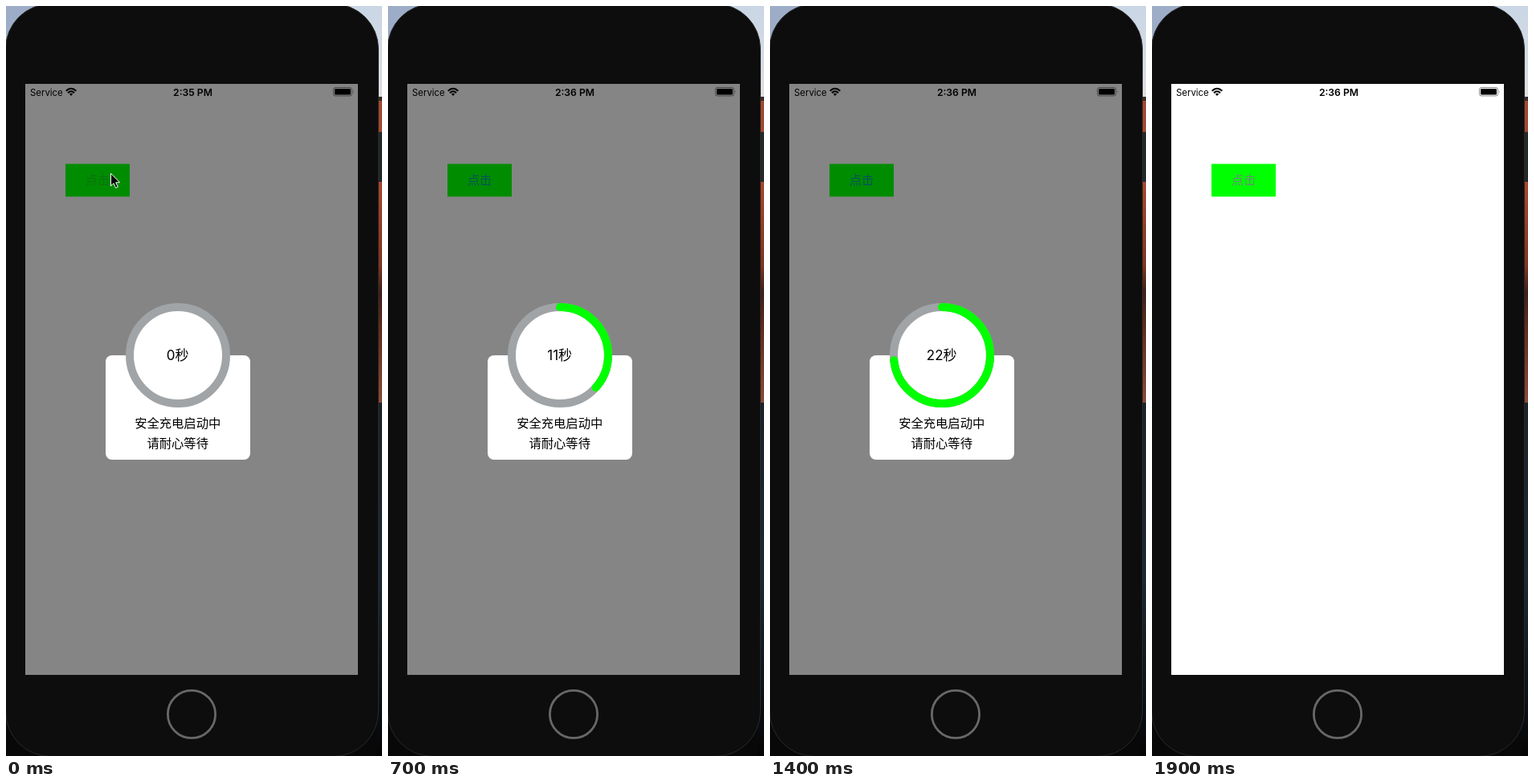
Recreate the animation shown at these times as an HTML page. Size 468x934 px, loop 2 s.

```html
<!DOCTYPE html>
<html lang="zh-CN">
<head>
<meta charset="utf-8">
<title>Charging countdown</title>
<style>
  html, body { margin: 0; width: 100%; height: 100%; overflow: hidden; background: #0d0d0d; }
  svg { display: block; width: 100%; height: 100%; }
  text { font-family: Inter, "Noto Sans CJK SC", "Noto Sans CJK", sans-serif; }
  .middle { text-anchor: middle; }
  .message { font-size: 15.3px; }
</style>
</head>
<body>
<svg viewBox="0 0 468 934">
  <defs>
    <linearGradient id="sky" x2="0" y2="1">
      <stop stop-color="#c9d6e5"/>
      <stop offset="1" stop-color="#dedfe2"/>
    </linearGradient>
    <linearGradient id="cliff" x2="0" y2="1">
      <stop stop-color="#a9472e"/>
      <stop offset=".38" stop-color="#81351f"/>
      <stop offset=".5" stop-color="#40201a"/>
      <stop offset=".72" stop-color="#6d301f"/>
      <stop offset="1" stop-color="#8b4a38"/>
    </linearGradient>
    <linearGradient id="shade" x2="0" y2="1">
      <stop stop-color="#1c2229"/>
      <stop offset=".5" stop-color="#1b2935"/>
      <stop offset=".85" stop-color="#0b1016"/>
      <stop offset="1" stop-color="#050505"/>
    </linearGradient>
  </defs>

  <!-- Desktop behind the phone -->
  <rect width="468" height="934" fill="#080808"/>
  <rect width="60" height="60" fill="#9dadc8"/>
  <rect x="400" width="68" height="113" fill="url(#sky)"/>
  <rect x="460" y="113" width="8" height="5" fill="#382a28"/>
  <rect x="460" y="118" width="8" height="39" fill="#a34a30"/>
  <rect x="460" y="157" width="8" height="62" fill="#23292b"/>
  <rect x="460" y="219" width="8" height="275" fill="url(#cliff)"/>
  <rect x="460" y="494" width="8" height="440" fill="url(#shade)"/>

  <!-- Phone -->
  <rect x="-.5" y="-2.5" width="464" height="937" rx="56" fill="#0d0d0d" stroke="#292929"/>
  <circle cx="231" cy="882" r="29.6" fill="none" stroke="#686868" stroke-width="2.8"/>
  <rect id="screen" x="24" y="97" width="414" height="736"/>

  <!-- Status bar -->
  <text x="30" y="111.7" font-size="11.4">Service</text>
  <text id="clock" class="middle" x="232.5" y="111.8" font-size="12.2" font-weight="600"></text>
  <g fill="none" stroke="#000" stroke-width="2">
    <path d="M74.7 105.8Q81 99.8 87.3 105.8M77 108.2Q81 104.4 85 108.2"/>
    <path d="M78.8 109.6Q81 107.7 83.2 109.6L81 112Z" fill="#000" stroke="none"/>
  </g>
  <rect x="407.5" y="101.5" width="23" height="10.5" rx="2.5" fill="none" stroke="#000" stroke-opacity=".45"/>
  <rect x="409" y="103" width="20" height="7.5" rx="1.2"/>
  <path d="M432 105q1.6 1.8 0 3.6z" fill-opacity=".5"/>

  <rect id="button" x="74" y="196.6" width="80" height="40.8"/>
  <text id="buttonLabel" class="middle" x="114" y="222.4" font-size="15">点击</text>

  <g id="dialog">
    <rect x="124" y="435" width="180" height="130" rx="8" fill="#fff"/>
    <circle cx="214" cy="435" r="60" fill="#fff" stroke="#a0a4a6" stroke-width="10"/>
    <circle id="progress" cx="214" cy="435" r="60" fill="none" stroke="#0f0" stroke-width="10"
            stroke-linecap="round" pathLength="30" transform="rotate(-90 214 435)"/>
    <text id="seconds" class="middle" x="213.7" y="441" font-size="17"></text>
    <text class="middle message" x="213.7" y="525">安全充电启动中</text>
    <text class="middle message" x="213.7" y="550">请耐心等待</text>
  </g>

  <path id="cursor" d="M130.5 208.5v15.5l3.5-3.2 2.6 5.7 2.7-1.2-2.6-5.5h4.8z" stroke="#fff"/>
</svg>
<script>
  const LOOP = 2000, STEP = 100, DISMISS_STEP = 19, SECONDS_PER_STEP = 1.6;
  const el = id => document.getElementById(id);
  const show = (id, visible) => el(id).setAttribute("visibility", visible ? "visible" : "hidden");
  const fill = (id, color) => el(id).setAttribute("fill", color);

  function draw(step) {
    const open = step < DISMISS_STEP;
    const pressed = step === 0;
    const count = Math.round(step * SECONDS_PER_STEP);

    fill("screen", open ? "#858585" : "#fff");
    fill("button", open ? "#008c00" : "#00ff00");
    fill("buttonLabel", pressed ? "#08730f" : open ? "#045060" : "#6f8780");
    el("clock").textContent = pressed ? "2:35 PM" : "2:36 PM";
    el("seconds").textContent = count + "秒";
    el("progress").setAttribute("stroke-dasharray", `${count} 30`);
    show("dialog", open);
    show("progress", open && count > 0);
    show("cursor", pressed);
  }

  const start = performance.now();
  function tick() {
    draw(Math.floor((performance.now() - start) % LOOP / STEP));
    requestAnimationFrame(tick);
  }
  tick();
</script>
</body>
</html>
```
